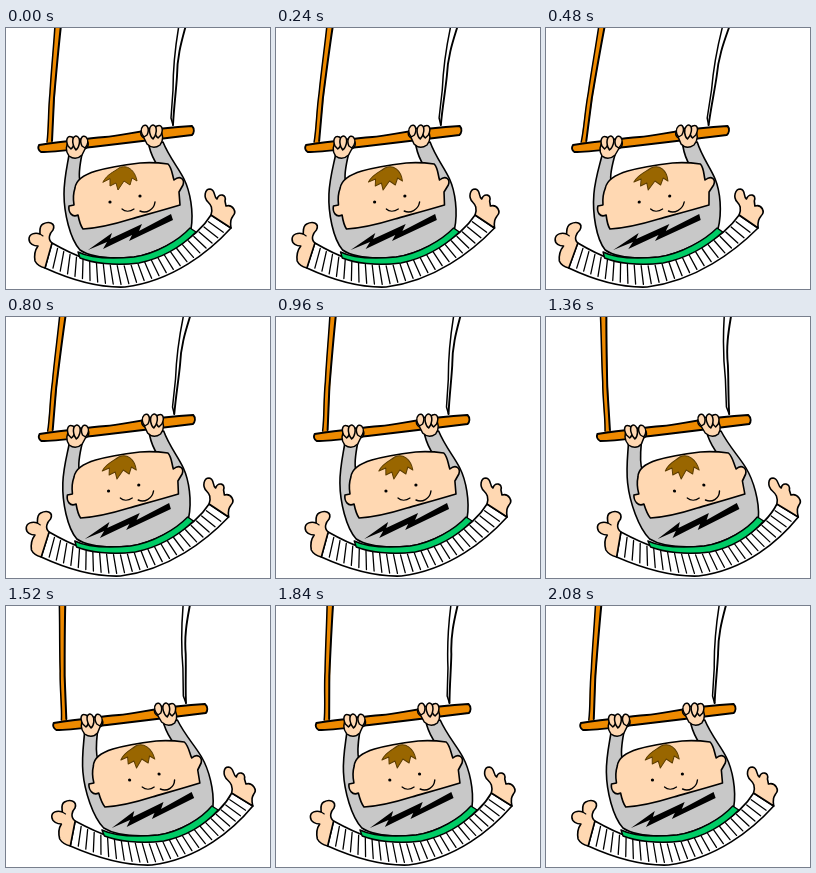
Write an HTML page that moves like this. It is 264x261 px and loops after 2.16 s.

```html
<!DOCTYPE html>
<html lang="en">
<head>
<meta charset="utf-8">
<title>Trapeze</title>
<style>
  html, body { margin: 0; width: 100%; height: 100%; overflow: hidden; background: #fff; }
  svg { display: block; width: 100vw; height: 100vh; }
  #swing { stroke: #000; stroke-width: 1.6; stroke-linecap: round; stroke-linejoin: round; fill: none; }
  .wood { fill: #ee8a00; }
  .skin { fill: #ffd8b2; }
  .shirt { fill: #c8c8c8; }
  .white { fill: #fff; }
  .ink { fill: #000; stroke: none; }
</style>
</head>
<body>
<svg viewBox="0 0 264 261">
  <g id="swing">
    <!-- ropes -->
    <path class="wood" stroke="none" d="M49-3 L55-3 C52 25 49 65 46 116 L41 117 C42 75 46 35 49-3Z"/>
    <path stroke-width="1.5" d="M49-3 C48 15 45 45 44 65 C42 83 43 99 41 114"/>
    <path stroke-width="2" d="M55-3 C52 24 50 47 48 70 L46 113"/>
    <path stroke-width="1.5" d="M173-3 C169 20 167 40 167 62 L165 90 L167 97"/>
    <path stroke-width="1.9" d="M180-3 C176 12 171 28 171 48 C170 64 168 78 167 97"/>

    <!-- shirt and arms -->
    <path class="shirt" d="M63 127 C61 139 58 151 58 166 C58 185 64 211 74 222 C86 230 107 231 128 229 C149 226 176 211 185 201 C188 184 184 163 178 151 C172 139 163 129 157 114 L143 118 C145 126 147 131 152 138 L110 160 L74 153 C72 146 74 136 76 126Z"/>

    <!-- legs -->
    <path class="white" d="M46 215 C69 228 87 236 118 236 C153 234 191 210 205 187 L225 200 C204 223 167 253 119 259 C92 260 61 250 39 240Z"/>
    <path id="legTop" stroke="none" d="M46 215 C69 228 87 236 118 236 C153 234 191 210 205 187"/>
    <path id="legBottom" stroke="none" d="M39 240 C61 250 92 260 119 259 C167 253 204 223 225 200"/>
    <path id="stripes" stroke-width="1.3"/>
    <path fill="#00cc66" stroke-width="1.4" d="M72 224 C84 230 104 231 128 229 C150 226 173 212 184 200 L190 204 C177 217 157 230 133 235 C108 238 86 235 74 230Z"/>

    <!-- feet -->
    <path class="skin" d="M46 215 C41 211 44 205 47 202 C50 195 43 193 37 196 C33 198 34 202 34 206 C29 204 23 206 23 211 C23 216 28 218 32 218 C29 222 28 227 29 233 C31 237 35 239 39 240Z"/>
    <path stroke-width="1.1" d="M34 206 L37 208"/>
    <path class="skin" d="M205 187 C207 180 205 177 202 174 C197 169 199 161 204 161 C210 162 207 168 211 171 C213 165 221 166 219 173 L220 178 C227 176 231 184 227 188 C225 191 224 193 225 200Z"/>

    <!-- head -->
    <path class="skin" d="M69 160 C70 151 80 146 90 143 C104 139 118 137 134 135 C146 134 155 135 162 136 C166 140 166 146 168 152 C174 147 179 151 177 157 L173 164 L174 177 C154 183 139 187 125 191 C109 196 94 200 77 201 C74 197 73 192 72 187 C66 190 62 184 63 178 L68 177 C67 171 67 166 69 160Z"/>
    <path fill="#996600" stroke="#5c3d00" stroke-width="1" d="M97 154 C101 146 108 144 113 140 C121 136 129 142 131 153 L126 150 L124 157 L118 153 L112 162 L110 155 L104 158 L104 151Z"/>
    <ellipse class="ink" cx="104" cy="174" rx="1.6" ry="1.5"/>
    <ellipse class="ink" cx="134" cy="168" rx="1.6" ry="1.5"/>
    <path stroke-width="1.2" d="M116 181 C119 184 124 184 128 181"/>
    <path stroke-width="1.4" d="M134 183 C140 186 148 182 149 174"/>
    <path class="ink" d="M82 222 L106 205 L104 211 L136 196 L133 203 L165 186 L167 192 L123 213 L126 207 L97 221 L101 214Z"/>

    <!-- bar and hands -->
    <path class="wood" stroke-width="1.8" d="M33 117 C54 114 76 111 99 109 C119 107 145 100 186 98 C189 101 188 105 186 107 C155 111 119 115 86 119 C68 121 50 124 35 124 C32 122 32 119 33 117Z"/>
    <g id="hand" class="skin" stroke-width="1.5">
      <path d="M63 128 C59 123 60 117 63 113 L77 111 C83 112 84 118 79 121 L76 127 C72 131 67 131 63 128Z"/>
      <path d="M62 118 C59 111 62 107 66 109 C70 111 68 119 65 121Z"/>
      <path d="M68 119 C65 111 68 106 72 109 C75 112 73 120 70 122Z"/>
      <path d="M76 118 C73 112 76 106 80 109 C83 112 82 117 79 120Z"/>
    </g>
    <use href="#hand" transform="translate(217 -11) scale(-1 1)"/>
  </g>
</svg>
<script>
const FRAME_MS = 80, FRAMES = 27;
// Each pose: frame, sideways shift, shear along the height.
const POSES = [[0, 0, 0], [7, 4.3, -.097], [17, 5.7, .108], [27, 0, 0]];
const swing = document.getElementById("swing");

function drawStripes() {
  const top = document.getElementById("legTop");
  const bottom = document.getElementById("legBottom");
  const count = 26;
  let d = "";
  for (let i = 1; i < count; i++) {
    const a = top.getPointAtLength(top.getTotalLength() * i / count);
    const b = bottom.getPointAtLength(bottom.getTotalLength() * i / count);
    const along = k => `${a.x + (b.x - a.x) * k} ${a.y + (b.y - a.y) * k}`;
    d += `M${along(.08)}L${along(.88)}`;
  }
  document.getElementById("stripes").setAttribute("d", d);
}

function poseAt(frame) {
  const i = POSES.findIndex(pose => pose[0] > frame);
  const from = POSES[i - 1], to = POSES[i];
  const k = (frame - from[0]) / (to[0] - from[0]);
  return from.map((v, n) => v + (to[n] - v) * k);
}

function render(ms) {
  const [, shift, shear] = poseAt(Math.floor(ms / FRAME_MS) % FRAMES);
  swing.setAttribute("transform", `matrix(1 0 ${shear} 1 ${shift} 0)`);
}

drawStripes();
const start = performance.now();
function tick() {
  render(performance.now() - start);
  requestAnimationFrame(tick);
}
tick();
</script>
</body>
</html>
```
